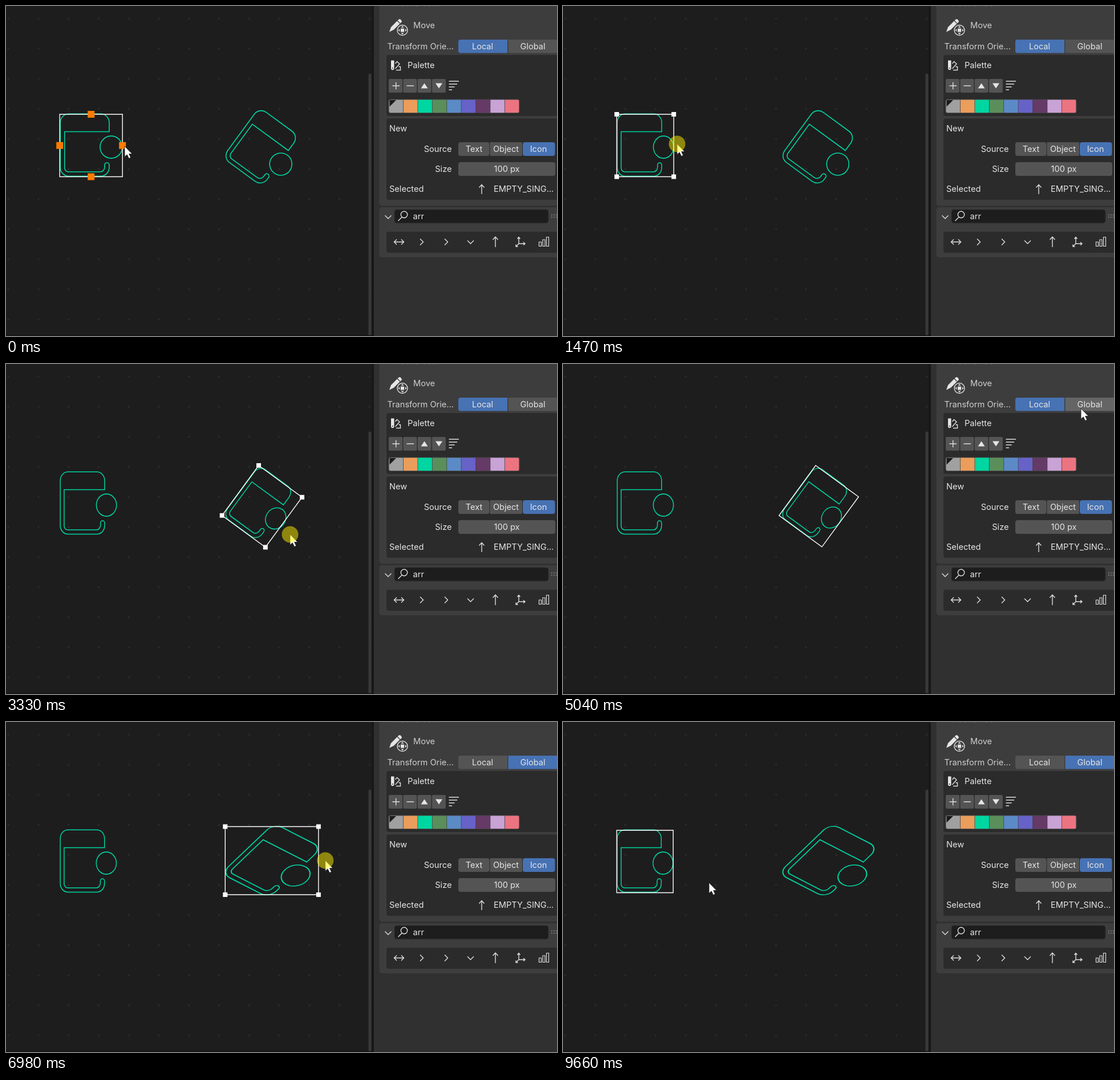
These frames come from a looping animation (966x579 px, 9.73 s). An HTML page:

```html
<!DOCTYPE html>
<html lang="en">
<head>
<meta charset="utf-8">
<title>Scaling icons</title>
<style>
html, body { margin: 0; width: 100%; height: 100%; overflow: hidden; background: #1d1d1d; }
svg { display: block; width: 966px; height: 579px; }
text { font: 14.6px Inter, sans-serif; fill: #e6e6e6; }
.mid { text-anchor: middle; }
.end { text-anchor: end; }
.dim { fill: #cfcfcf; }
.line { fill: none; stroke: #dedede; stroke-width: 1.4; }
.glyph { fill: #e6e6e6; }
.panel { fill: #3d3d3d; }
.well { fill: #2b2b2b; }
.button { fill: #545454; }
.on { fill: #4772b3; }
.hover { fill: #656565; }
.icon { fill: none; stroke: #00d6a3; stroke-width: 1.6; }
.icon * { vector-effect: non-scaling-stroke; }
</style>
</head>
<body>
<svg viewBox="0 0 966 579">
  <defs>
    <pattern id="dots" x="-22.4" y="-4.3" width="52.78" height="52.78" patternUnits="userSpaceOnUse">
      <circle cx="26.4" cy="26.4" r="1.7" fill="#2b2b2b"/>
    </pattern>
    <g id="card">
      <path d="M86.7 30.5V14.3A15 15 0 0 0 71.7-.7H16A15 15 0 0 0 1 14.3V93.5A15 15 0 0 0 16 108.5H71.7A15 15 0 0 0 86.7 93.5V89a4 4 0 0 0-8 0V93a8 8 0 0 1-8 8H15.5a7 7 0 0 1-7-7V30.5Z"/>
      <circle cx="90.2" cy="57.6" r="19.5"/>
    </g>
    <clipPath id="swatchClip"><rect x="671" y="164" width="229" height="23.5" rx="4"/></clipPath>
  </defs>

  <rect width="966" height="579" fill="#1d1d1d"/>
  <rect width="641" height="577" fill="url(#dots)"/>
  <rect x="635.5" y="118.500" width="5" height="470" rx="2.500" fill="#393939"/>
  <rect x="641" width="4" height="579" fill="#181818"/>
  <rect y="577.5" width="645" height="2" fill="#161313"/>

  <rect x="645" width="321" height="579" fill="#303030"/>
  <rect class="panel" x="654.5" y="-10" width="330" height="360.5" rx="5"/>
  <rect class="panel" x="654.5" y="353" width="330" height="88" rx="5"/>
  <rect class="well" x="667" y="86" width="320" height="107" rx="4"/>
  <rect class="well" x="667" y="197.500" width="320" height="142.500" rx="4"/>
  <rect class="well" x="667" y="396" width="320" height="37" rx="4"/>

  <text x="682" y="1" style="fill:#5c5c5c">Active Tool</text>
  <path class="glyph" d="M672 45.500L675 37 688.500 23.500Q691 22 693 25T692.500 29L680 41.500Z"/>
  <path d="M686 25.500L690.500 30.500" stroke="#3d3d3d" stroke-width="1.3"/>
  <circle cx="695" cy="42.500" r="9" fill="#3d3d3d" stroke="#e0e0e0" stroke-width="1.4"/>
  <path class="glyph" d="M692 39.500h6v6h-6ZM692.500 37.700l2.500-2.700 2.500 2.700ZM692.500 47.300l2.500 2.700 2.500-2.700ZM690.200 40l-2.700 2.500 2.700 2.500ZM699.800 40l2.700 2.500-2.700 2.500Z"/>
  <text class="dim" x="714" y="39">Move</text>

  <text class="dim" x="668.500" y="76">Transform Orie...</text>
  <path id="local" d="M797 59H879V82.500H797Q793 82.500 793 78.500V63Q793 59 797 59Z"/>
  <rect id="global" x="880.500" y="59" width="90" height="23.500"/>
  <text class="mid" x="835.500" y="76">Local</text>
  <text class="mid" x="923.500" y="76">Global</text>

  <path class="glyph" d="M675 95.500h5.500v14a2.750 2.750 0 0 1-5.500 0Z"/>
  <path class="line" d="M682.500 101L685.500 97.500 690 101.500 682.500 110M684 112.500H691.500V106.500H688.500"/>
  <circle cx="677.700" cy="109" r="1" fill="#2b2b2b"/>
  <text x="704" y="109">Palette</text>

  <g id="buttons"></g>
  <path class="line" d="M677.500 140H690M683.700 133.700V146.300M702.500 140H715"/>
  <path class="glyph" d="M727.500 144.500l6-9 6 9ZM753 135.500h12l-6 9Z"/>
  <path class="line" d="M776.500 132H794M776.500 137H791M776.500 142H786.500M776.500 147H782"/>
  <rect x="670.500" y="163.500" width="230" height="24.500" rx="4" fill="#444"/>
  <g id="swatches" clip-path="url(#swatchClip)"></g>
  <path d="M672.500 165H684L672.500 176.500Z" fill="#1b1b1b"/>

  <text x="672" y="220">New</text>
  <text class="end" x="781.500" y="255.500">Source</text>
  <text class="end" x="781.500" y="291">Size</text>
  <text class="mid" x="820.500" y="255.500">Text</text>
  <text class="mid" x="876.500" y="255.500">Object</text>
  <text class="mid" x="933.500" y="255.500">Icon</text>
  <text class="mid" x="878" y="291">100 px</text>
  <text x="672" y="326">Selected</text>
  <path class="line" d="M834 330V314M829.500 318.500L834 313.500 838.500 318.500"/>
  <text x="855" y="326">EMPTY_SING...</text>

  <path class="line" d="M664.500 367.500L670 373 675.500 367.500"/>
  <rect x="681" y="357" width="270" height="24" rx="4" fill="#1d1d1d" stroke="#333"/>
  <circle class="line" cx="698" cy="366" r="5.700"/>
  <path class="line" d="M694 370.500L687.500 377"/>
  <text x="713.500" y="373.500">arr</text>
  <path d="M956 366.500H966M956 370.500H966" stroke="#9a9a9a" stroke-width="1.500" stroke-dasharray="1.500 2.500"/>

  <path class="line" d="M681 414H697M685 409.500L680.500 414 685 418.500M693 409.500L697.500 414 693 418.500
    M726 408.500L731.500 414 726 419.500M769 408.500L774.500 414 769 419.500M809 411.500L814.500 417 820 411.500
    M858 423V405.500M853.500 410L858 405 862.500 410
    M899 406V417H909M899 417L894 422M896.500 408.500L899 405.500 901.500 408.500M907 414.500L910 417 907 419.500M894 418.500V422H897.500"/>
  <path class="line" style="stroke-width:1.200" d="M934.500 414h4v7.500h-4ZM941 410h4v11.500h-4ZM947.500 405.500h4v16h-4Z"/>

  <g class="icon">
    <use id="leftIcon" href="#card"/>
    <use id="rightIcon" href="#card"/>
  </g>
  <polygon id="frame" fill="none" stroke="#fff" stroke-width="1.400"/>
  <path id="corners" fill="#fff"/>
  <path id="middles" fill="#ff7b00"/>
  <path id="cursor" d="M0 0V18.500L4.200 14.800 7.500 21.500 10.700 20 7.700 13.500H13.200Z" fill="#fff" stroke="#181818" stroke-width=".8"/>
  <circle id="press" r="14.500" fill="#fff000" fill-opacity=".5"/>
</svg>
<script>
const LOOP = 9730;
const $ = id => document.getElementById(id);
const rect = (cls, x, y, w, h, rx, extra = '') =>
  `<rect class="${cls}" x="${x}" y="${y}" width="${w}" height="${h}" rx="${rx}" ${extra}/>`;

$('buttons').innerHTML =
  [0, 1, 2, 3].map(i => rect('button', 671 + i * 25.3, 128, 24, 24, 2)).join('') +
  rect('button', 793, 239, 54.500, 24, 4) + rect('button', 848.500, 239, 56.500, 24, 1) +
  rect('on', 906, 239, 56.500, 24, 4) + rect('button', 793, 274, 170, 24, 4);
$('swatches').innerHTML =
  ['#a0a0a0', '#eb9d5c', '#00d6a1', '#5a8f5c', '#5b8ac6', '#6662c8', '#653a66', '#c9a2d6', '#ec7480']
    .map((c, i) => rect('', 671.500 + i * 25.4, 164.500, 24.600, 23, 0, `fill="${c}"`)).join('');

// Keys: [time, value, ...]
const leftScale = [[0, 1], [140, 1], [700, 1.57], [1250, .909], [8180, .905], [8650, 1.44], [9150, .9]];
const rightScale = [[2150, 1], [3050, 1.62], [3260, .857], [3330, .877], [3650, .96], [4050, .847]];
const rightStretch = [[6095, 1], [6700, 1.49], [7050, 1.425]];
const cursorPath = [
  [0, 208, 246], [140, 208, 246], [700, 271, 246], [1250, 200, 242], [1620, 200, 242],
  [2020, 516, 309], [2150, 516, 309], [3050, 570, 350], [3260, 497, 298], [3330, 498, 299],
  [3650, 506, 305], [4050, 496, 297], [4300, 496, 297], [4900, 908, 78], [5320, 908, 78],
  [5860, 512, 245], [6095, 512, 243], [6700, 567, 243], [7050, 559, 243], [7230, 559, 243],
  [7800, 200, 241], [8180, 200, 241], [8650, 256, 241], [9150, 199, 242], [9500, 199, 242], [9655, 256, 282]
];
const pressed = [[70, 1600], [2090, 4280], [5110, 5250], [6080, 7180], [8130, 9180]];
const dragging = [[140, 1600], [2160, 4280], [6110, 7180], [8210, 9180]];
const hovering = [[0, 140], [1600, 1700], [1930, 2160], [4280, 4400], [5800, 6110], [7180, 7280], [7700, 8210], [9180, 9590]];

function sample(keys, t) {
  const next = keys.findIndex(k => k[0] > t);
  if (next === 0) return keys[0].slice(1);
  if (next < 0) return keys[keys.length - 1].slice(1);
  const a = keys[next - 1], b = keys[next];
  const u = (t - a[0]) / (b[0] - a[0]), e = u * u * (3 - 2 * u);
  return a.slice(1).map((v, i) => v + (b[i + 1] - v) * e);
}
const within = (spans, t) => spans.some(([from, to]) => t >= from && t < to);
const show = (el, on) => el.setAttribute('visibility', on ? 'visible' : 'hidden');
const squares = (points, size) =>
  points.map(([x, y]) => `M${x - size / 2} ${y - size / 2}h${size}v${size}h${-size}Z`).join('');
const box = (x, y, w, h) => [[x, y], [x + w, y], [x + w, y + h], [x, y + h]];

const ANGLE = 36.2 * Math.PI / 180, COS = Math.cos(ANGLE), SIN = Math.sin(ANGLE);
const PIVOT = 384.5;

function frameCorners(t, isGlobal) {
  const late = Math.max(0, t - 70);  // the frame trails the shape
  if (t < 1850 || t >= 7600) return box(94.2, 190, 110 * sample(leftScale, late)[0], 109.5);
  if (isGlobal) return box(384.3, 183.5, 113 * sample(rightStretch, late)[0], 119.5);
  const w = 110 * sample(rightScale, late)[0];
  return box(0, 0, w, 108.8).map(([u, v]) => [443 + COS * u - SIN * v, 178 + SIN * u + COS * v]);
}

function draw(t) {
  const isGlobal = t >= 5180;
  const s = sample(rightScale, t)[0], k = sample(rightStretch, t)[0];
  $('leftIcon').setAttribute('transform', `translate(94.2 190) scale(${sample(leftScale, t)[0]} 1)`);
  $('rightIcon').setAttribute('transform',
    `matrix(${[k * COS * s, SIN * s, -k * SIN, COS, PIVOT + k * (443 - PIVOT), 177.7]})`);

  const corners = frameCorners(t, isGlobal);
  const middles = corners.map(([x, y], i) => {
    const [nx, ny] = corners[(i + 1) % 4];
    return [(x + nx) / 2, (y + ny) / 2];
  });
  $('frame').setAttribute('points', corners.join(' '));
  $('corners').setAttribute('d', squares(corners, 8));
  $('middles').setAttribute('d', squares(middles, 12));
  show($('corners'), within(dragging, t));
  show($('middles'), within(hovering, t));

  const [x, y] = sample(cursorPath, t);
  $('cursor').setAttribute('transform', `translate(${x} ${y})`);
  $('press').setAttribute('transform', `translate(${x} ${y})`);
  show($('press'), within(pressed, t));

  const overGlobal = x > 880 && y < 83;
  $('local').setAttribute('class', isGlobal ? 'button' : 'on');
  $('global').setAttribute('class', isGlobal ? 'on' : overGlobal ? 'hover' : 'button');
}

const start = performance.now();
function tick() {
  draw((performance.now() - start) % LOOP);
  requestAnimationFrame(tick);
}
tick();
</script>
</body>
</html>
```
